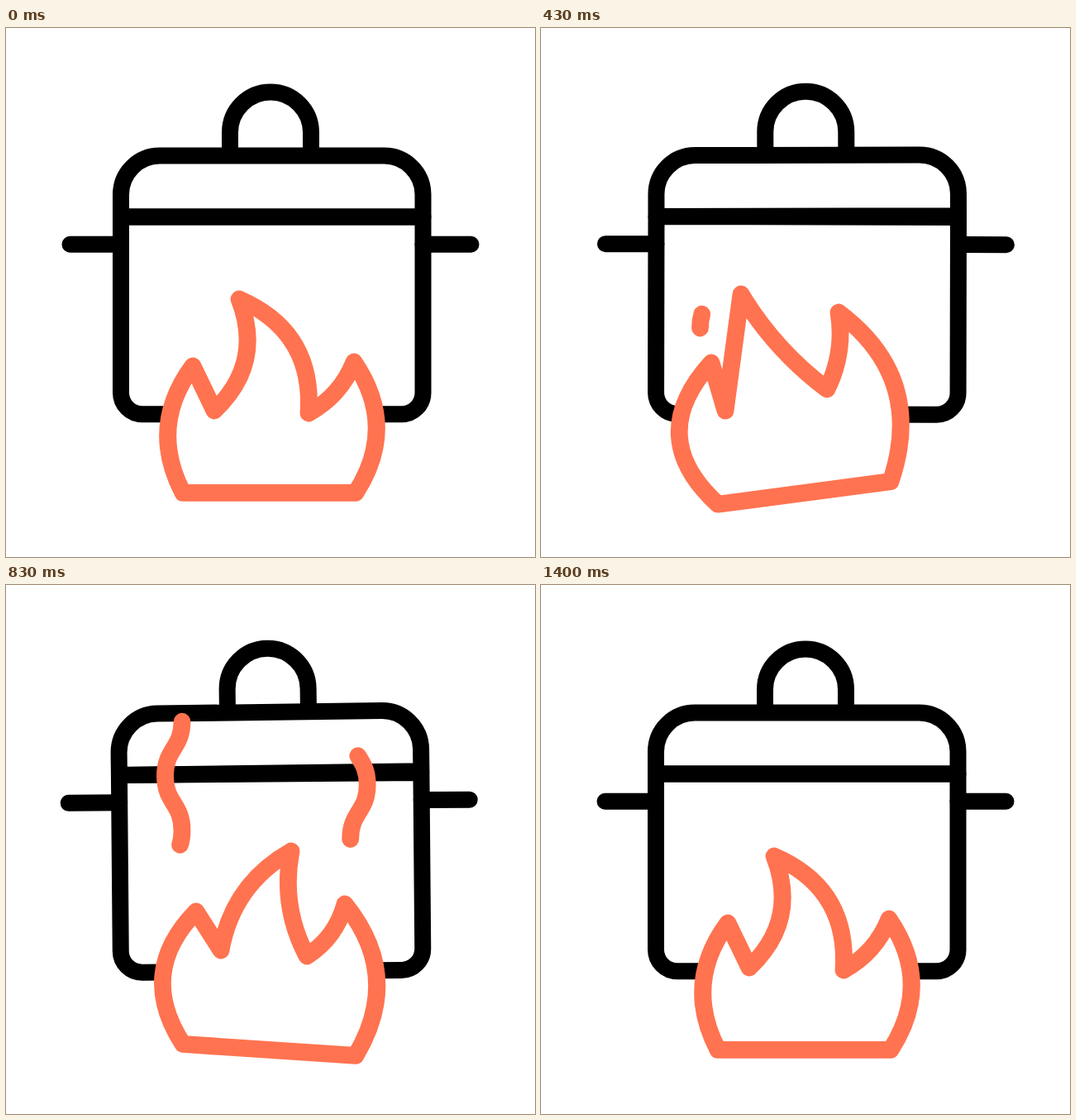
Write an HTML page that moves like this. It is 640 px wide and 640 px high and loops after 1.67 s.

```html
<!DOCTYPE html>
<html lang="en">
<head>
<meta charset="utf-8">
<title>Cooking pot</title>
<style>
  html, body { margin: 0; width: 100%; height: 100%; overflow: hidden; background: #fff; }
  svg { display: block; width: 100vw; height: 100vh; }
  path { stroke-width: 20; stroke-linecap: round; stroke-linejoin: round; fill: none; }
  .pot path { stroke: #000; }
  .hot { stroke: #ff7350; stroke-width: 20.8; }
  #flame { fill: #fff; }
</style>
</head>
<body>
<svg viewBox="0 0 640 640">
  <g id="pot" class="pot">
    <path d="M77.5 261.7H139M504.5 261.7H562.5"/>
    <path d="M139 228.5H504.5V441A26 26 0 0 1 478.5 467.3H165A26 26 0 0 1 139 441Z"/>
    <g id="lid">
      <path d="M139 228.5V201.5A47 47 0 0 1 186 154.6H457.5A47 47 0 0 1 504.5 201.5V228.5Z"/>
      <path d="M271 154V126.5A49 49 0 0 1 369 126.5V154"/>
    </g>
  </g>
  <path id="steamL" class="hot"/>
  <path id="steamR" class="hot"/>
  <path id="flame" class="hot"/>
</svg>
<script>
const LOOP = 1670, STEP = 100 / 3;
const $ = id => document.getElementById(id);
const smooth = x => { x = Math.min(1, Math.max(0, x)); return x * x * (3 - 2 * x); };
const mix = (a, b, k) => a.map((v, i) => v + (b[i] - v) * k);

// Smooth curve through [time, values] keys, flat at every turning point.
function track(keys) {
  const last = keys.length - 1;
  const rate = (i, c) => (keys[i + 1][1][c] - keys[i][1][c]) / (keys[i + 1][0] - keys[i][0]);
  const slope = (i, c) => {
    if (i === 0 || i === last) return 0;
    const a = rate(i - 1, c), b = rate(i, c);
    return a * b <= 0 ? 0 : 2 * a * b / (a + b);
  };
  return t => {
    if (t <= keys[0][0]) return keys[0][1];
    if (t >= keys[last][0]) return keys[last][1];
    const i = keys.findIndex((k, j) => t < keys[j + 1][0]);
    const h = keys[i + 1][0] - keys[i][0], u = (t - keys[i][0]) / h;
    return mix(keys[i][1], keys[i + 1][1], smooth(u)).map((v, c) =>
      v + h * u * (1 - u) * ((1 - u) * slope(i, c) - u * slope(i + 1, c)));
  };
}

// Base tilt, left swell, bend up to and down from the main tip,
// then the points: left tip, dip, main tip, dip, right tip.
const rest = [0, -32, 31, -38, 226, 409, 252, 463, 282, 328, 366, 466, 421, 404];
const left = [13.8, -57, 0, 10, 206, 405, 223, 463, 242, 322, 346, 437, 360, 344];
const rise = [-3, -41, -13, 7, 239, 387, 257, 446, 325, 308, 361, 425, 411, 364];
const right = [-7, -43, -23, 15, 230, 395, 260, 442, 345, 322, 364, 449, 410, 386];
const back = [10, -39, -3, 2, 199, 421, 238, 462, 282, 333, 351, 464, 383, 388];
const farLeft = mix(rest, left, 1.15);
const farRight = mix(farLeft, rise, 1.6);
const farBack = mix(rest, back, 1.4);

const flameAt = track([[7, rest], [13, left], [15, farLeft], [19, rise],
  [22, farRight], [25, right], [30, farBack], [34, back], [42, rest]]);
const tiltAt = track([[4, [0]], [7, [-2.6]], [9, [-0.53]], [13, [0.12]],
  [19, [1.65]], [28, [-1.24]], [35, [0]]]);

// Curve from a to b, pushed sideways by `bend`.
function arc(a, b, bend) {
  const dx = b[0] - a[0], dy = b[1] - a[1], len = Math.hypot(dx, dy);
  const at = k => [a[0] + dx * k - dy / len * bend, a[1] + dy * k + dx / len * bend];
  return "C" + [at(1 / 3), at(2 / 3), b].flat().map(v => v.toFixed(2)).join(" ");
}

function flamePath([tilt, swell, up, down, ...xy]) {
  const [tipL, dipL, tip, dipR, tipR] = [0, 2, 4, 6, 8].map(i => xy.slice(i, i + 2));
  const baseL = [214, 562.4 + tilt], baseR = [423, 562.4 - tilt];
  const reach = Math.hypot(baseR[0] - tipR[0], baseR[1] - tipR[1]);
  return `M${baseL}` + arc(baseL, tipL, swell) + `L${dipL}` + arc(dipL, tip, up) +
    arc(tip, dipR, down) + arc(dipR, tipR, 10) + arc(tipR, baseR, 12.5 - reach * 0.3) + "Z";
}

// A wavy wisp that grows upwards, then vanishes from its lower end.
function makeSteam(id, x, y, start) {
  const el = $(id);
  el.setAttribute("d", `M${x} ${y}c0-33 20.5-33 20.5-66s-20.5-33-20.5-66s20.5-33 20.5-66`);
  const len = el.getTotalLength();
  return n => {
    const head = smooth((n - start) / 15) * len;
    const tail = smooth((n - start - 9.7) / 15) * len;
    el.style.display = head - tail > 0.01 ? "" : "none";
    el.style.strokeDasharray = `${head - tail} ${len * 2}`;
    el.style.strokeDashoffset = -tail;
  };
}
const steams = [makeSteam("steamL", 192.5, 363, 10.4), makeSteam("steamR", 416.7, 307.5, 17.4)];

function draw(ms) {
  const n = Math.floor((ms % LOOP + 5) / STEP);
  const u = n >= 4 && n < 34 ? (n - 4) % 10 / 10 : 0;
  const lift = 3.7 * smooth(1 - Math.abs(2 * u - 1)) ** 1.2;
  $("pot").setAttribute("transform", `rotate(${tiltAt(n)[0]} 320 470)`);
  $("lid").setAttribute("transform", `rotate(${-lift} 139 228.5)`);
  $("flame").setAttribute("d", flamePath(flameAt(n)));
  steams.forEach(s => s(n));
}

const t0 = performance.now();
function tick() {
  draw(performance.now() - t0);
  requestAnimationFrame(tick);
}
tick();
</script>
</body>
</html>
```
